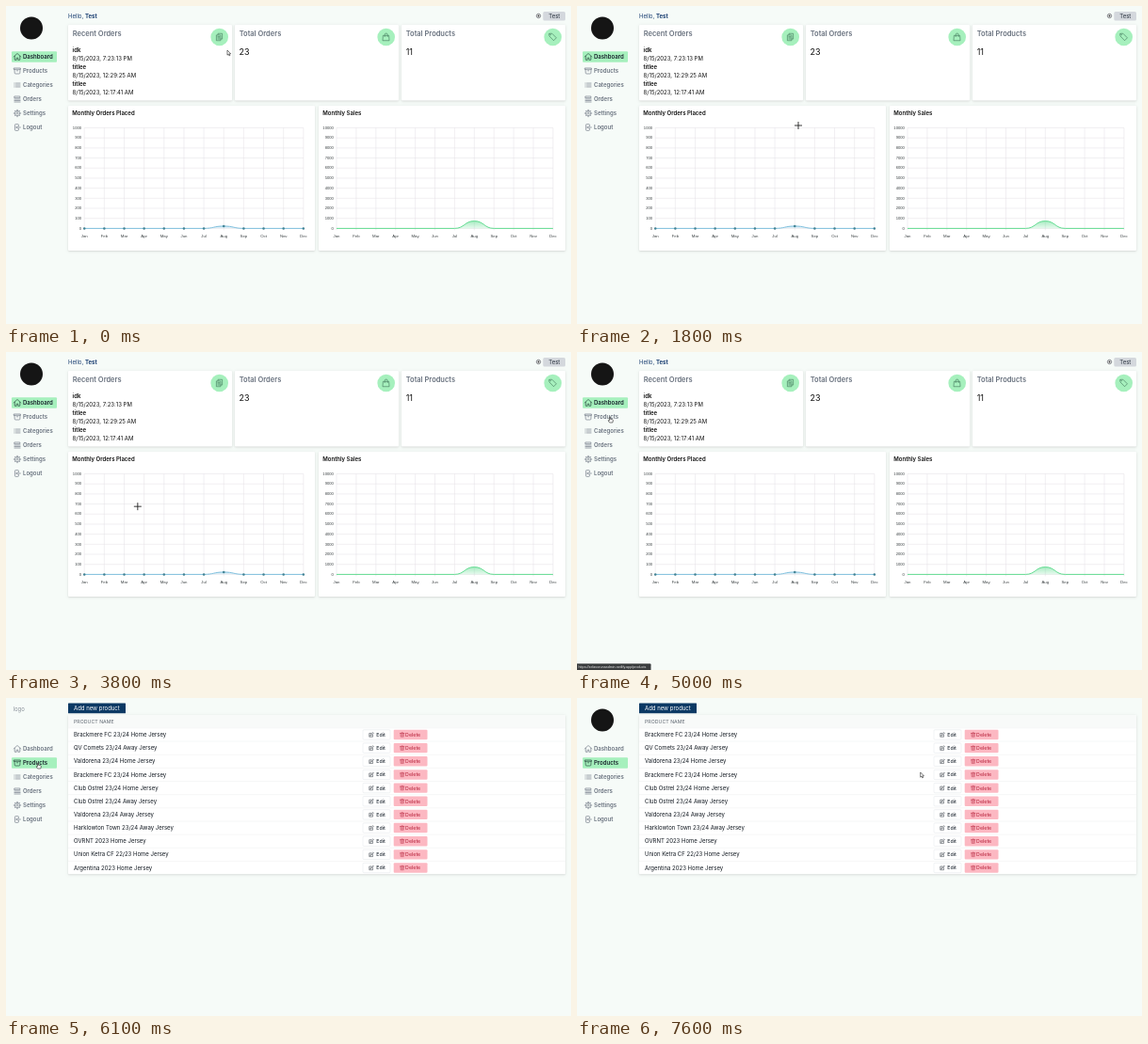
Write an HTML page with a canvas that moves like this. It is 600 px wide and 338 px high and loops after 8000 ms.

```html
<!DOCTYPE html>
<html lang="en">
<head>
<meta charset="utf-8">
<title>Store admin</title>
<style>
html, body { margin: 0; width: 100%; height: 100%; overflow: hidden; background: #f6fbf8; }
canvas { display: block; width: 600px; height: 338px; }
</style>
</head>
<body>
<canvas id="stage"></canvas>
<script>
const LOOP = 8000, STEP = 100;
const canvas = document.getElementById('stage');
const ctx = canvas.getContext('2d');
const ratio = window.devicePixelRatio || 1;
canvas.width = 600 * ratio;
canvas.height = 338 * ratio;

const INTER = 'Inter, sans-serif';
const ARIAL = '"Liberation Sans", Arial, sans-serif';
const GRAY = '#68717e', NAVY = '#173c70', MINT = '#a6f0bd', DARK = '#17212b';
const MONTHS = 'Jan Feb Mar Apr May Jun Jul Aug Sep Oct Nov Dec'.split(' ');
const AUG = 7;

const ICONS = {
  home: 'M2.3 12L11.2 3Q12 2.4 12.8 3L21.7 12M4.5 9.8V20Q4.5 21 5.6 21H9.8V15H14.2V21H18.4Q19.5 21 19.5 20V9.8',
  box: 'M20 7.5L19.5 18Q19.4 20 17 20H7Q4.6 20 4.5 18L4 7.5M10 11.5H14M3 4H21V7.5H3Z',
  list: 'M8 6.8H20M8 12H20M8 17.2H20M3.5 6.8h.9M3.5 12h.9M3.5 17.2h.9',
  queue: 'M3.8 12H20.2M3.8 16H20.2M3.8 20H20.2M4.5 4H19.5V8.5H4.5Z',
  cog: 'M12 4.5a7.5 7.5 0 1 0 .01 0M12 9a3 3 0 1 0 .01 0M12 2v2.5M12 19.5V22M2 12h2.5M19.5 12H22M5 5l2 2M17 17l2 2M19 5l-2 2M5 19l2-2',
  exit: 'M15.8 9V5Q15.8 3 13.5 3H7.5Q5.2 3 5.2 5V19Q5.2 21 7.5 21H13.5Q15.8 21 15.8 19V15M12 9l-3 3 3 3M9 12H21',
  papers: 'M8 7V3H19V17H15M5 7H15V21H5Z M7.5 11h5m-5 3h5m-5 3h5',
  bag: 'M5 8H19L20 21H4ZM8.5 11V6a3.5 3.5 0 0 1 7 0V11',
  tag: 'M3 4.5V9.5L14 21 21 14 10 3H4.5Q3 3 3 4.5ZM6.5 6.5h.5',
  pen: 'M9 12L19 2.5 21.5 5 12 15 8 16ZM18 13V21H3V6H11',
  trash: 'M3 6H21M5 6L6 21H18L19 6M9 6V3H15V6M10 10V17M14 10V17'
};
for (const name in ICONS) ICONS[name] = new Path2D(ICONS[name]);

const NAV = [['Dashboard', 'home'], ['Products', 'box'], ['Categories', 'list'],
  ['Orders', 'queue'], ['Settings', 'cog'], ['Logout', 'exit']];
const PRODUCTS = ['Brackmere FC 23/24 Home', 'QV Comets 23/24 Away', 'Valdorena 23/24 Home',
  'Brackmere FC 23/24 Home', 'Club Ostrel 23/24 Home', 'Club Ostrel 23/24 Away',
  'Valdorena 23/24 Away', 'Harklowton Town 23/24 Away', 'OVRNT 2023 Home',
  'Union Ketra CF 22/23 Home', 'Argentina 2023 Home'];

// Pointer stops: time, x, y
const PATH = [[0, 235, 47], [100, 339, 120], [200, 339, 120], [900, 293, 133],
  [1300, 262, 130], [1400, 262, 130], [1800, 235, 127], [1900, 235, 127],
  [2700, 237, 232], [2800, 237, 232], [2900, 239, 235], [3300, 239, 235],
  [3900, 120, 150], [4300, 120, 150], [4600, 36, 74], [4900, 36, 74],
  [5000, 35, 69], [5300, 35, 69], [5800, 34, 69], [6300, 34, 69],
  [6600, 220, 74], [7000, 220, 74], [7300, 350, 80], [7500, 350, 80], [7600, 364.7, 79]];

function text(s, x, y, size, color, { weight = 400, family = INTER, align = 'left' } = {}) {
  ctx.font = `${weight} ${size}px ${family}`;
  ctx.fillStyle = color;
  ctx.textAlign = align;
  ctx.textBaseline = 'alphabetic';
  ctx.fillText(s, x, y);
}

function rect(x, y, w, h, fill, { radius = 0, stroke, shadow } = {}) {
  ctx.save();
  ctx.beginPath();
  ctx.roundRect(x, y, w, h, radius);
  if (shadow) {
    ctx.shadowColor = 'rgba(0,0,0,.16)';
    ctx.shadowBlur = 2.2 * ratio;
    ctx.shadowOffsetY = .7 * ratio;
  }
  ctx.fillStyle = fill;
  ctx.fill();
  ctx.restore();
  if (stroke) {
    ctx.strokeStyle = stroke;
    ctx.lineWidth = .5;
    ctx.stroke();
  }
}

function line(x1, y1, x2, y2, color, width = .5) {
  ctx.beginPath();
  ctx.moveTo(x1, y1);
  ctx.lineTo(x2, y2);
  ctx.strokeStyle = color;
  ctx.lineWidth = width;
  ctx.stroke();
}

function circle(x, y, r, fill, stroke, width = 1) {
  ctx.beginPath();
  ctx.arc(x, y, r, 0, Math.PI * 2);
  ctx.fillStyle = fill;
  ctx.fill();
  if (!stroke) return;
  ctx.strokeStyle = stroke;
  ctx.lineWidth = width;
  ctx.stroke();
}

function icon(name, x, y, color, size = 9, width = 1.7) {
  ctx.save();
  ctx.translate(x - size / 2, y - size / 2);
  ctx.scale(size / 24, size / 24);
  ctx.strokeStyle = color;
  ctx.lineWidth = width;
  ctx.lineJoin = ctx.lineCap = 'round';
  ctx.stroke(ICONS[name]);
  ctx.restore();
}

function sidebar(active, logoReady) {
  if (logoReady) circle(27, 23.5, 12, '#151515');
  else text('logo', 7.5, 13.6, 6, '#8b929b');
  NAV.forEach(([label, name], i) => {
    const y = 54 + i * 15, on = i === active;
    if (on) rect(6, y - 5.7, 48, 11.5, MINT, { radius: 1 });
    icon(name, 12, y, on ? '#1d3c33' : GRAY);
    text(label, 18, y + 2.2, 6, on ? DARK : GRAY, { weight: 600 });
  });
}

function card(x, title, name) {
  rect(x, 20, 174, 80.6, '#fff', { radius: 1, shadow: true });
  text(title, x + 4.7, 32.2, 7.5, GRAY, { weight: 600 });
  circle(x + 160.7, 33, 9.3, MINT);
  icon(name, x + 160.7, 33, '#41775a', 10, 1.5);
}

function chart({ x, title, left, step, top, value, color, fade, fill, markers }) {
  const y0 = 236.4, yTop = 129.5, right = left + step * 11;
  rect(x, 106, 262, 154, '#fff', { radius: 1, shadow: true });
  text(title, x + 4.3, 116.2, 6, '#101010', { weight: 600 });
  for (let i = 0; i <= 10; i++) {
    const y = y0 - (y0 - yTop) * i / 10;
    line(left, y, right, y, '#e2dfe5');
    text(top * i / 10, left - 3.2, y + 1.2, 4.125, '#373d3f', { family: ARIAL, align: 'right' });
  }
  MONTHS.forEach((month, i) => {
    const mx = left + step * i;
    line(mx, yTop, mx, y0 + 2, '#e2dfe5');
    text(month, mx, 245.8, 4.3, '#373d3f', { family: ARIAL, align: 'center' });
  });

  const peak = y0 - (y0 - yTop) * value / top;
  const at = i => left + step * i;
  const trace = () => {
    ctx.beginPath();
    ctx.moveTo(left, y0);
    ctx.lineTo(at(AUG - 1), y0);
    ctx.bezierCurveTo(at(AUG - .5), y0, at(AUG - .5), peak, at(AUG), peak);
    ctx.bezierCurveTo(at(AUG + .5), peak, at(AUG + .5), y0, at(AUG + 1), y0);
    ctx.lineTo(right, y0);
  };
  trace();
  const shade = ctx.createLinearGradient(0, peak, 0, y0);
  shade.addColorStop(0, fill);
  shade.addColorStop(1, fade);
  ctx.fillStyle = shade;
  ctx.fill();
  trace();
  ctx.strokeStyle = color;
  ctx.lineWidth = 1;
  ctx.stroke();
  if (markers) MONTHS.forEach((_, i) => circle(at(i), i === AUG ? peak : y0, 1.25, '#448494'));
}

function tooltip() {
  ctx.setLineDash([1, 1]);
  line(231, 129.5, 231, 236, '#b6c0c4', .4);
  ctx.setLineDash([]);
  circle(231, 234, 2.4, '#fff', '#4b9aa0', .9);
  rect(175, 210, 55, 26.3, '#fff', { radius: 1.5, stroke: '#dedede', shadow: true });
  rect(175.2, 210.2, 54.6, 11.8, '#eceff1', { radius: [1.5, 1.5, 0, 0] });
  text('Aug', 177.7, 217.8, 4.5, '#222', { family: ARIAL });
  circle(181.2, 229.2, 2.2, '#80ced0');
  text('Orders Placed', 187, 230.8, 4.5, '#222', { family: ARIAL });
  text('23', 220, 230.8, 4.5, '#222', { family: ARIAL, weight: 700 });
  rect(223, 237, 16, 14, '#eceff1', { radius: 1, stroke: '#a3b1b8' });
  text('Aug', 231, 245.8, 4.5, '#222', { family: ARIAL, align: 'center' });
}

function dashboard() {
  text('Hello, ', 66, 12.6, 6, NAVY);
  text('Test', 84, 12.6, 6, NAVY, { weight: 700 });
  circle(565.5, 10.5, 2.2, '#f4f4f4', '#565b60', .7);
  circle(565.5, 10.5, .9, '#333');
  rect(570.3, 6, 23.7, 9.4, '#d4d8dd', { radius: 1.5 });
  text('Test', 582.3, 12.7, 6, '#27313d', { align: 'center' });

  card(66, 'Recent Orders', 'papers');
  card(243, 'Total Orders', 'bag');
  card(420, 'Total Products', 'tag');
  [['idk', '7:23:13 PM'], ['titlee', '12:29:25 AM'], ['titlee', '12:17:41 AM']].forEach(([name, time], i) => {
    const y = 49 + i * 18;
    text(name, 70.6, y, 6, '#111', { weight: 600 });
    text('8/15/2023, ' + time, 70.6, y + 9, 6, '#111');
  });
  text('23', 247.5, 51.6, 9, '#111');
  text('11', 424.7, 51.6, 9, '#111');

  chart({ x: 66, title: 'Monthly Orders Placed', left: 83.2, step: 21.15, top: 1000, value: 23,
    color: '#7fc0de', fill: 'rgba(127,192,222,.5)', fade: 'rgba(127,192,222,.1)', markers: true });
  chart({ x: 332, title: 'Monthly Sales', left: 351, step: 20.9, top: 10000, value: 730,
    color: '#62dc91', fill: 'rgba(98,220,145,.55)', fade: 'rgba(98,220,145,.15)' });
}

function button(x, y, w, label, name, fill, stroke, color, weight) {
  rect(x, y - 5.2, w, 10.4, fill, { radius: 1, stroke });
  icon(name, x + 9, y, color, 6, 2);
  text(label, x + (name === 'pen' ? 14.3 : 12.4), y + 1.9, 5.25, color, { weight });
}

function productTable(loaded) {
  const pitch = 14.15, bottom = loaded ? 187.3 : 31.5;
  rect(66, 5.6, 61, 10.6, '#0c3964', { radius: .5 });
  text('Add new product', 72, 13, 6, '#fff');
  rect(66, 18, 528, bottom - 18, '#fff', { radius: 1, shadow: true });
  rect(66, 18, 528, 13.5, '#f8faf9');
  text('PRODUCT NAME', 72, 26.6, 5.25, '#606872');
  if (!loaded) return;
  PRODUCTS.forEach((name, i) => {
    const y = 39 + i * pitch;
    line(66, y - pitch / 2, 594, y - pitch / 2, '#eceeef');
    text(name + ' Jersey', 72, y + 2.1, 6, '#111820');
    button(379, y, 29, 'Edit', 'pen', '#fff', '#e1e4e8', '#222b35', 500);
    button(411.7, y, 35.8, 'Delete', 'trash', '#fcb8c2', null, '#bd3048', 500);
  });
}

function pointerAt(t) {
  let i = PATH.length - 1;
  while (PATH[i][0] > t) i--;
  const [t0, x0, y0] = PATH[i];
  const [t1, x1, y1] = PATH[i + 1] || [LOOP, x0, y0];
  const k = (t - t0) / (t1 - t0);
  return [x0 + (x1 - x0) * k, y0 + (y1 - y0) * k];
}

function pointer(t) {
  const [x, y] = pointerAt(t);
  const inChart = t < 5600 && y > 125 && y < 237 && x > 83 && x < 316;
  if (inChart || (t >= 100 && t < 900)) {
    line(x - 4, y, x + 4, y, '#222', .9);
    line(x, y - 4, x, y + 4, '#222', .9);
    return;
  }
  const hand = x < 54 && y > 48;
  const shape = new Path2D(hand
    ? 'M-.5 .2Q0-.4 .5 .2V2.3L2.8 2.8Q3.4 3 3.3 4L2.8 6H-.4L-2 3.8Q-1.8 3-.5 3.8Z'
    : 'M0 0V5.2L1.2 4.1 2 5.9 2.9 5.5 2.1 3.8H3.7Z');
  ctx.save();
  ctx.translate(x, y);
  ctx.fillStyle = '#fff';
  ctx.fill(shape);
  ctx.strokeStyle = '#222';
  ctx.lineWidth = .6;
  ctx.stroke(shape);
  ctx.restore();
}

function statusBar() {
  rect(0, 331.2, 78.5, 7, '#3a3c3e', { radius: [0, 1, 0, 0] });
  text('https://zelavorunaadmin.netlify.app/products', 1.5, 336.2, 3.7, '#e8e8e8', { family: ARIAL });
}

function draw(t) {
  const products = t >= 5600;
  ctx.setTransform(ratio, 0, 0, ratio, 0, 0);
  ctx.fillStyle = '#f6fbf8';
  ctx.fillRect(0, 0, 600, 338);
  sidebar(products ? 1 : 0, !products || t >= 6400);
  if (products) productTable(t >= 6000);
  else dashboard();
  if (t >= 2500 && t < 3500) tooltip();
  if (t >= 4600 && t < 6000) statusBar();
  pointer(t);
}

const start = performance.now();
function tick() {
  const t = (performance.now() - start) % LOOP;
  draw(Math.floor(t / STEP) * STEP);
  requestAnimationFrame(tick);
}
tick();
</script>
</body>
</html>
```
